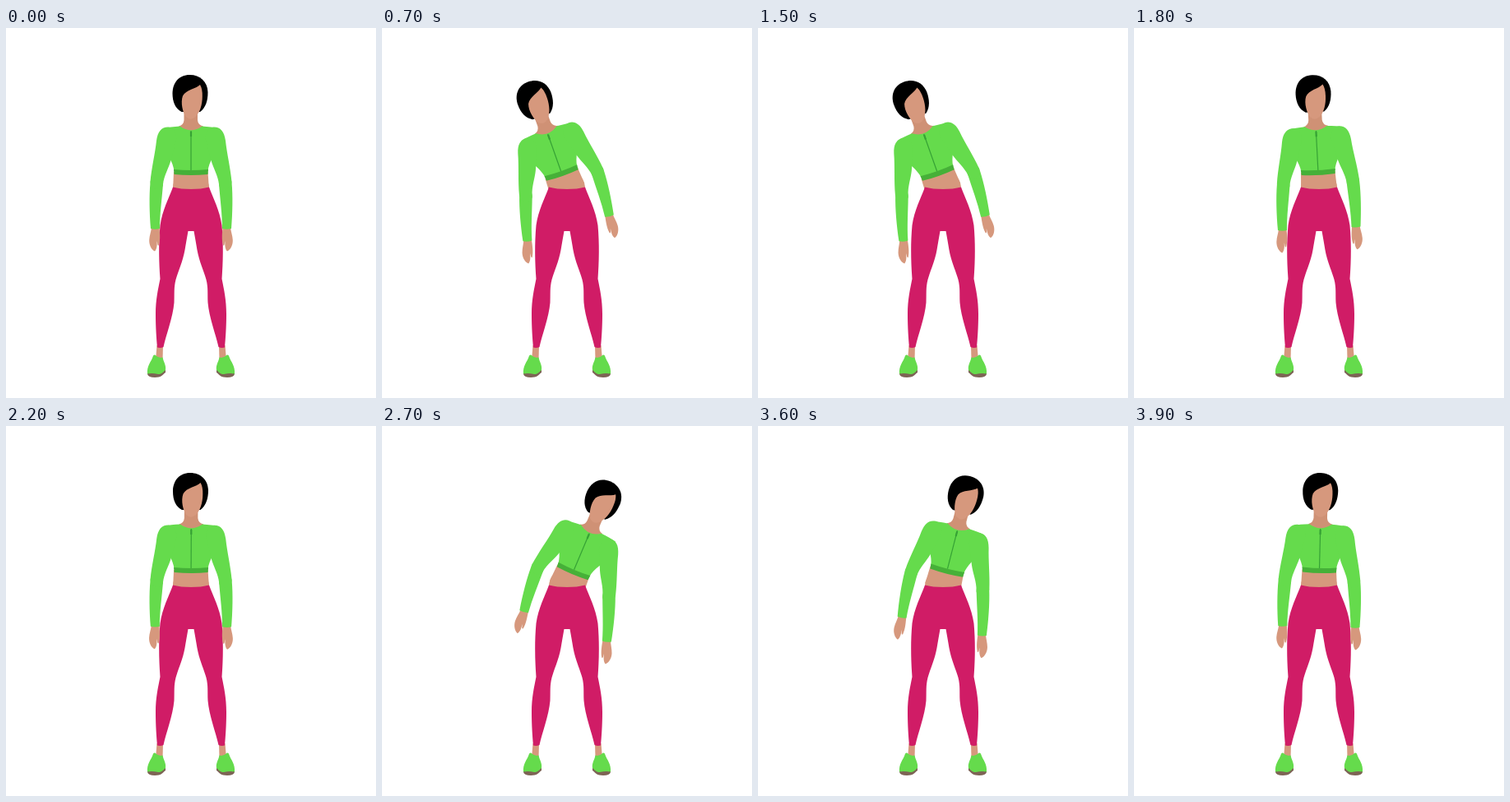
These frames come from a looping animation (450x450 px, 4 s). An HTML page:

```html
<!DOCTYPE html>
<html lang="en">
<head>
<meta charset="utf-8">
<title>Side bends</title>
<style>
  html, body { margin: 0; width: 100%; height: 100%; overflow: hidden; background: #fff; }
  svg { display: block; width: 100vw; height: 100vh; }
  .green { fill: #65db4c; }
  .skin { fill: #d6987d; }
  .pants { fill: #d01c66; }
</style>
</head>
<body>
<svg viewBox="0 0 450 450">
  <defs>
    <g id="leg">
      <path class="skin" d="M183.500 386H191L190.500 404H182Z"/>
      <path class="pants" d="M226 196Q212 196 203 193.500C198 207 190 222 187.500 240C185.500 262 186 285 187.500 305C185 318 182 330 182 348C182 364 183 378 184 388.500Q188 389.500 191.500 388C195 372 203 352 204.500 334C205 322 204 316 206.500 306C210 294 215 284 217.500 270Q219.500 258 221.500 247H226Z"/>
      <path fill="#7d6455" d="M172 417V421Q173 425 181 425C189 425 190 422 194 419V414Z"/>
      <path class="green" d="M181 397.500Q186 402 190.500 400.500C191.500 406 195 410 194 416C191.500 418 189 421.500 185 421Q178 419.500 172 420.500C171 411 176.500 406 178.500 400Q179 397 181 397.500Z"/>
    </g>
    <g id="forearm">
      <path class="skin" d="M177 242H186.500C187 249 188 257 186 264Q184.500 266 184 261L183.500 259C184 264 183.500 269 181 271.500C177 270 174 264 174.200 258C174.500 252 176.500 248 177 242Z"/>
      <path class="green" d="M175.500 188C174 204 174.500 226 176 244Q181.500 245.500 187 244C187 226 189.500 209 191 190C191 178 176 178 175.500 188Z"/>
    </g>
    <path id="upper" class="green" d="M197 120.500C189 120.500 184.500 126 183 137C181.500 152 177 170 175.500 187C176 199 190.500 199 191 190C192 180 198 170 200.500 161L207 136C208 127 204 121 197 120.500Z"/>
  </defs>

  <g class="lean skin">
    <path d="M204 175H245.500L247 197H203Z"/>
    <circle cx="225" cy="195" r="22"/>
  </g>

  <use href="#leg"/>
  <use href="#leg" transform="translate(450) scale(-1 1)"/>

  <g class="lean">
    <path fill="#cf9175" d="M216.500 98H233V112Q233.500 118 240 119.500L225 128L210 119.500Q216 118 216.500 112Z"/>
    <path d="M223.500 57C210 57 202.500 67 202.500 79.500C202.500 90 206 98 213.500 102H236C243 97 245.500 88 245.500 78C245 65 236 57 223.500 57Z"/>
    <path class="skin" d="M236 69C231 74 219 75 215 82.500C212 91 215 103 219 108Q224 113 230 108.500C236 103 238.800 93 238.800 83Q239 74 236 69Z"/>
    <path class="green" d="M211.500 119.500Q225 129 238.500 119.500C246 120 253 120.500 258 122L261 140C254 154 247 162 245.500 174H204.500C203 162 196 154 189 140L192 122C197 120.500 204 120 211.500 119.500Z"/>
    <path fill="#46b038" d="M204 172Q225 174 246 172L245.500 178Q225 180 204.500 178Z"/>
    <path fill="none" stroke="#36a235" stroke-width="1.200" d="M225 125V173"/>
    <path fill="none" stroke="#36a235" stroke-width="2.200" d="M225 126V132"/>
    <g class="arm"><use href="#forearm"/><use href="#upper"/></g>
    <g transform="translate(450) scale(-1 1)">
      <g class="arm"><use href="#forearm"/><use href="#upper"/></g>
    </g>
  </g>
</svg>
<script>
  const LOOP = 4000, STEP = 100;
  const bends = [
    { start: 238, peak: 1100, end: 1962, angle: -35 },
    { start: 2150, peak: 3070, end: 4020, angle: 35.2 }
  ];
  const trunk = document.querySelectorAll('.lean');
  const [left, right] = document.querySelectorAll('.arm');

  const ease = s => (1 - Math.cos(Math.PI * s)) / 2;

  function leanAt(t) {
    const b = bends.find(b => t > b.start && t < b.end);
    if (!b) return 0;
    const s = t < b.peak ? (t - b.start) / (b.peak - b.start) : (b.end - t) / (b.end - b.peak);
    return b.angle * ease(s);
  }

  const turn = (el, a, x, y) => el.setAttribute('transform', `rotate(${a} ${x} ${y})`);

  // The raised upper arm stays fixed to the trunk, the lowered one hangs down.
  function pose(arm, lean) {
    turn(arm, lean > 0 ? 0 : -0.47 * lean, 193, 135);
    turn(arm.firstElementChild, -0.33 * lean, 183, 189);
  }

  function draw() {
    const t = Math.floor((performance.now() + 10) / STEP) * STEP % LOOP;
    const lean = leanAt(t);
    trunk.forEach(el => turn(el, lean, 225, 195));
    pose(left, lean);
    pose(right, -lean);
    requestAnimationFrame(draw);
  }
  draw();
</script>
</body>
</html>
```
